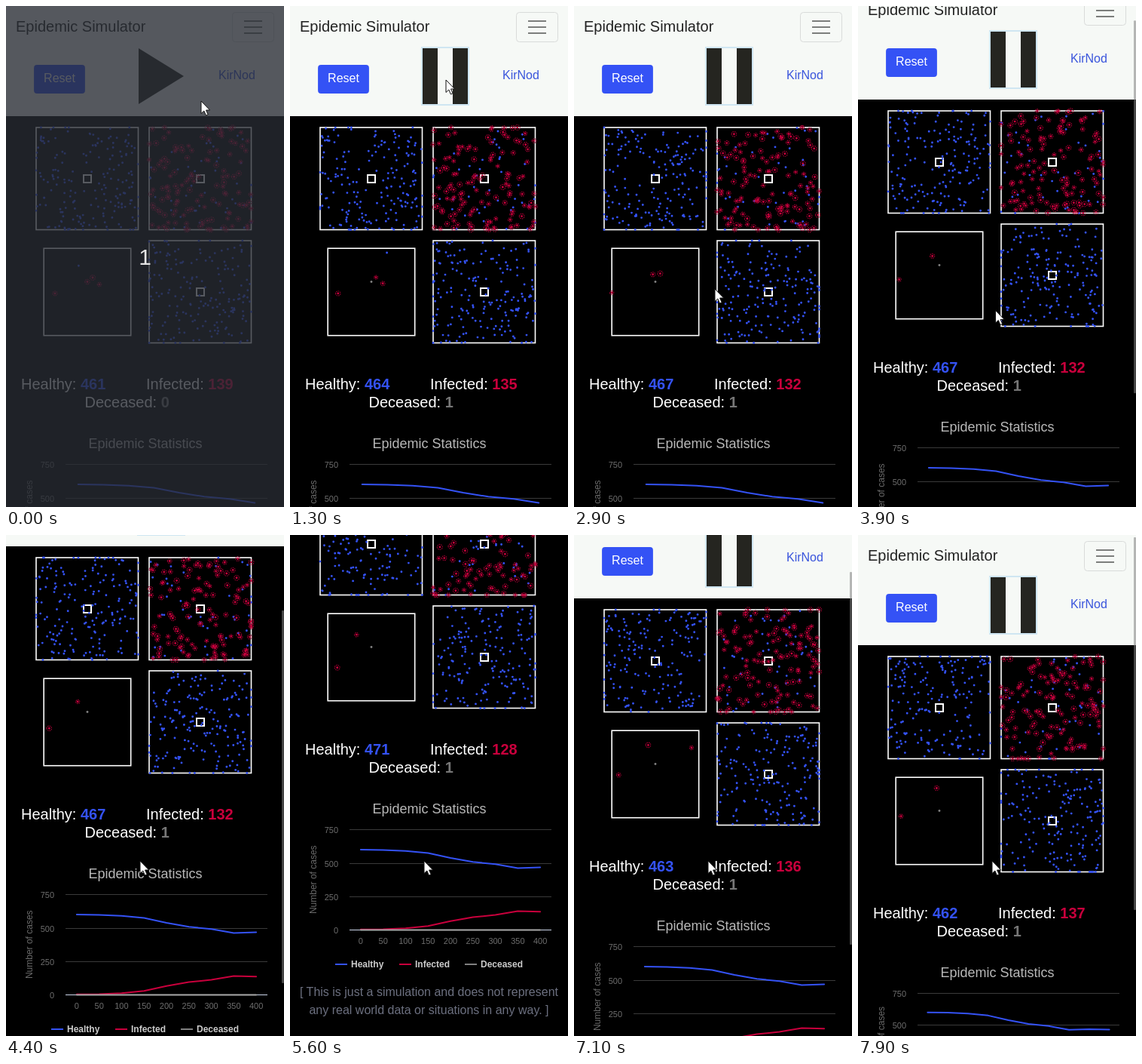
These frames come from a looping animation (369 px wide and 664 px high, 8 s). An HTML page:

```html
<!DOCTYPE html>
<html lang="en">
<head>
<meta charset="utf-8">
<title>Epidemic Simulator</title>
<style>
  html, body { margin: 0; width: 100%; height: 100%; overflow: hidden; background: #000; }
  svg { display: block; width: 100vw; height: 100vh; font-family: "Liberation Sans", Arial, sans-serif; }
  .dots { fill: none; stroke-width: 2.9; stroke-linecap: round; }
  .line { fill: none; stroke-width: 2; stroke-linejoin: round; stroke-linecap: round; }
</style>
</head>
<body>
<svg viewBox="0 0 369 664" xmlns="http://www.w3.org/2000/svg">
  <rect width="369" height="664"/>
  <g id="page">
    <rect width="369" height="146" fill="#f6f9f6"/>
    <text x="13" y="34" font-size="20" fill="#222">Epidemic Simulator</text>
    <rect x="300.5" y="8.5" width="55" height="39" rx="4" fill="none" stroke="#d9dbda"/>
    <path d="M316 20h24M316 28h24M316 36h24" stroke="#7c7e7c" stroke-width="2"/>
    <rect x="37.1" y="78" width="67.8" height="38" rx="4" fill="#3452f5"/>
    <text x="50.1" y="101" font-size="16" fill="#fff">Reset</text>
    <rect id="focus" x="175" y="55" width="62" height="76" fill="none" stroke="#cfe6f2" stroke-width="2"/>
    <path id="toggle" fill="#252520"/>
    <text x="282" y="97" font-size="16" fill="#3a55dc">KirNod</text>

    <g id="rooms" fill="none" stroke="#fff"></g>
    <path id="healthyDots" class="dots" stroke="#3452f5"/>
    <path id="rings" fill="none" stroke="#a00032" stroke-width="1.1" stroke-dasharray="1.6 1"/>
    <path id="infectedDots" class="dots" stroke="#c8003c"/>
    <path id="deadDot" class="dots" stroke="#808080"/>

    <g font-size="20" fill="#fff">
      <text x="20" y="508">Healthy: <tspan id="healthy" font-weight="bold" fill="#3452f5"/></text>
      <text x="186" y="508">Infected: <tspan id="infected" font-weight="bold" fill="#c8003c"/></text>
      <text x="104.5" y="532">Deceased: <tspan id="deceased" font-weight="bold" fill="#777"/></text>
    </g>
    <text x="185" y="586" font-size="18" fill="#b8b8b8" text-anchor="middle">Epidemic Statistics</text>
    <g id="chart"></g>
    <g id="legend" font-size="12" font-weight="bold" fill="#ccc"></g>
    <g font-size="16" fill="#6c7080" text-anchor="middle">
      <text x="184.5" y="828">[ This is just a simulation and does not represent</text>
      <text x="184.5" y="852">any real world data or situations in any way. ]</text>
    </g>
  </g>
  <g id="dim">
    <rect width="369" height="664" fill="#282c34" opacity=".78"/>
    <text x="184.5" y="343" font-size="30" fill="#e4e4e4" text-anchor="middle">1</text>
  </g>
  <rect id="bar" x="366" width="3" height="494" rx="1" fill="#808080"/>
  <path id="cursor" d="M0 0V16.5L3.8 13 6.4 19 9.2 17.8 6.6 12H11.6Z" fill="#fff" stroke="#111"/>
</svg>
<script>
const LOOP = 8000, TICK = 100, START = 1200, SIM_STEP = 140;
const PEOPLE = 600, ROOM = 135.5, WARD = 115.5;
const BLUE = "#3452f5", RED = "#c8003c";
const $ = id => document.getElementById(id);
const clamp = (v, lo, hi) => Math.max(lo, Math.min(hi, v));

const WEST = [40, 161], EAST = [190, 161], SOUTH = [190, 311], ISOLATION = [50.2, 321.2];
const GRAVE = [108, 365.5];

// Rows of [time, value...]
const SCROLL = [[3800, 0], [4400, 131], [4900, 217], [5700, 217], [7100, 62], [7600, 0]];
const CURSOR = [[500, 259, 126], [1000, 207, 98], [1400, 207, 98], [2000, 187, 375],
  [3800, 187, 375], [4000, 178, 432]];
const HEALTHY = [[1200, 463], [2900, 467], [4400, 467], [5600, 471], [7100, 463], [7900, 462]];
const PATIENTS = [
  [[1200, 65, 381], [2900, 50, 380], [5600, 63, 393], [8000, 57, 372]],
  [[1200, 115, 360], [5600, 88, 349], [8000, 105, 335]],
  [[1200, 124, 369], [3300, 112, 351]],
  [[6500, 156, 344], [7100, 156, 344], [7900, 116, 379]]
];
const CASES = [598, 596, 589, 573, 536, 507, 490, 461, 466, 462];

function tween(keys, t) {
  const next = keys.findIndex(k => k[0] > t);
  if (next <= 0) return (next ? keys[keys.length - 1] : keys[0]).slice(1);
  const a = keys[next - 1], b = keys[next], p = (t - a[0]) / (b[0] - a[0]);
  return a.slice(1).map((v, i) => v + (b[i + 1] - v) * p);
}

let seed = 4271;
const random = () => (seed = seed * 16807 % 2147483647) / 2147483647;

function crowd(count, [x, y]) {
  return Array.from({ length: count }, () => {
    const angle = random() * Math.PI * 2, speed = 10 + random() * 20;
    return { x, y, px: random() * 282, py: random() * 282,
      vx: Math.cos(angle) * speed, vy: Math.sin(angle) * speed };
  });
}
const well = [...crowd(190, WEST), ...crowd(190, SOUTH), ...crowd(45, EAST)];
const sick = crowd(128, EAST);

// Walk that reflects off the walls, pausing briefly against them
function bounce(v) {
  const m = ((v % 282) + 282) % 282;
  return clamp((m < 141 ? m : 282 - m) - 2.5, 0, ROOM);
}
const place = (d, s) => [d.x + bounce(d.px + d.vx * s), d.y + bounce(d.py + d.vy * s)];

// Now and then someone crosses from one room to another
const travellers = Array.from({ length: 8 }, (_, i) => {
  const [from, to] = i % 2 ? [WEST, SOUTH] : [ISOLATION, EAST];
  const start = START + i * 850, spot = ([x, y]) => [x + random() * WARD, y + random() * WARD];
  return [[start, ...spot(from)], [start + 700, ...spot(to)]];
});
const follow = (paths, t) => paths
  .filter(p => t >= p[0][0] && t <= p[p.length - 1][0]).map(p => tween(p, t));

const dotPath = pts => pts.map(([x, y]) => `M${x.toFixed(1)} ${y.toFixed(1)}h0`).join("");
const ringPath = (pts, t) => pts.map(([x, y], i) => {
  const r = 2.4 + 1.1 * ((t / 1000 + i * 0.37) % 1);
  return `M${x - r} ${y}a${r} ${r} 0 1 0 ${2 * r} 0a${r} ${r} 0 1 0 ${-2 * r} 0`;
}).join("");

const square = ([x, y], size, width) =>
  `<rect x="${x}" y="${y}" width="${size}" height="${size}" stroke-width="${width}"/>`;
$("rooms").innerHTML = square(ISOLATION, WARD, 1.6) + [WEST, EAST, SOUTH]
  .map(([x, y]) => square([x, y], ROOM, 1.6) + square([x + 63, y + 63], 10, 2)).join("");
$("deadDot").setAttribute("d", dotPath([GRAVE]));

$("legend").innerHTML = [["Healthy", 60, BLUE], ["Infected", 145, RED], ["Deceased", 232, "#808080"]]
  .map(([name, x, color]) => `<path d="M${x} 786h16" stroke="${color}" stroke-width="2"/>` +
    `<text x="${x + 21}" y="790">${name}</text>`).join("");

function chartMarkup(count) {
  const tilted = count > 9, top = 607, height = tilted ? 126.5 : 133.5, step = 268 / count;
  const px = i => 79 + step * (i + 0.5);
  const py = v => top + height * (1 - v / 750);
  const label = (x, y, text, pose) =>
    `<text x="${x}" y="${y}" font-size="11" fill="#6e6e6e" ${pose}>${text}</text>`;
  const series = (value, color) =>
    `<polyline class="line" stroke="${color}" points="${CASES.slice(0, count)
      .map((v, i) => `${px(i)},${py(value(v))}`).join(" ")}"/>`;
  let out = "";
  for (let v = 0; v <= 750; v += 250) {
    const y = v ? Math.round(py(v)) + 0.5 : py(0);
    out += `<path d="M79 ${y}H347" stroke="${v ? "#3a3a3a" : "#ccd6eb"}"/>` +
      label(64, y + 4.5, v, `text-anchor="end"`);
  }
  for (let i = 0; i < count; i++) {
    const x = px(i), y = top + height + 18.5;
    out += label(x, y, i * 50, tilted
      ? `text-anchor="end" transform="rotate(-45 ${x} ${y})"` : `text-anchor="middle"`);
  }
  out += `<text transform="translate(35 ${top + height / 2}) rotate(-90)" font-size="12" fill="#6a6a6a" text-anchor="middle">Number of cases</text>`;
  return out + series(v => v, BLUE) + series(v => 602 - v, RED) + series(() => 0, "#aaa");
}

let shownCount = 0;
function drawChart(count) {
  if (count === shownCount) return;
  shownCount = count;
  $("chart").innerHTML = chartMarkup(count);
}

// The scrollbar shows while scrolling and fades out at rest
function barOpacity(t) {
  if (t < 3900) return 0;
  return 0.55 * (t < 5800 ? clamp((5600 - t) / 400, 0, 1) : 1);
}

function render(t) {
  const running = t >= START;
  const steps = Math.max(0, Math.floor((t - START + 50) / SIM_STEP));
  const simTime = START + steps * SIM_STEP, seconds = simTime / 1000;
  const [scroll] = tween(SCROLL, t);
  const [cx, cy] = tween(CURSOR, t);

  $("page").setAttribute("transform", `translate(0 ${-Math.round(scroll)})`);
  $("dim").style.display = t < 400 ? "" : "none";
  $("cursor").setAttribute("transform", `translate(${cx} ${cy})`);
  $("bar").setAttribute("y", 3 + scroll * 0.74);
  $("bar").setAttribute("opacity", barOpacity(t));
  $("focus").style.display = t >= 1000 ? "" : "none";
  $("toggle").setAttribute("d", running ? "M176 56h20v74h-20zM216 56h20v74h-20z" : "M176 56L236 93 176 130Z");

  const ill = [...sick.map(d => place(d, seconds)), ...follow(PATIENTS, simTime)];
  const fine = [...well.map(d => place(d, seconds)), ...follow(travellers, simTime)];
  if (!running) ill.push(GRAVE);
  $("healthyDots").setAttribute("d", dotPath(fine));
  $("infectedDots").setAttribute("d", dotPath(ill));
  $("rings").setAttribute("d", ringPath(ill, simTime));
  $("deadDot").style.display = running ? "" : "none";

  const healthy = running ? Math.ceil(tween(HEALTHY, t)[0]) : 461, dead = running ? 1 : 0;
  $("healthy").textContent = healthy;
  $("infected").textContent = PEOPLE - healthy - dead;
  $("deceased").textContent = dead;
  drawChart(t < 3300 ? 8 : t < 7800 ? 9 : 10);
}

const began = performance.now();
let lastTick = -1;
function frame() {
  const t = Math.floor((performance.now() - began) % LOOP / TICK) * TICK;
  if (t !== lastTick) render(lastTick = t);
  requestAnimationFrame(frame);
}
frame();
</script>
</body>
</html>
```
